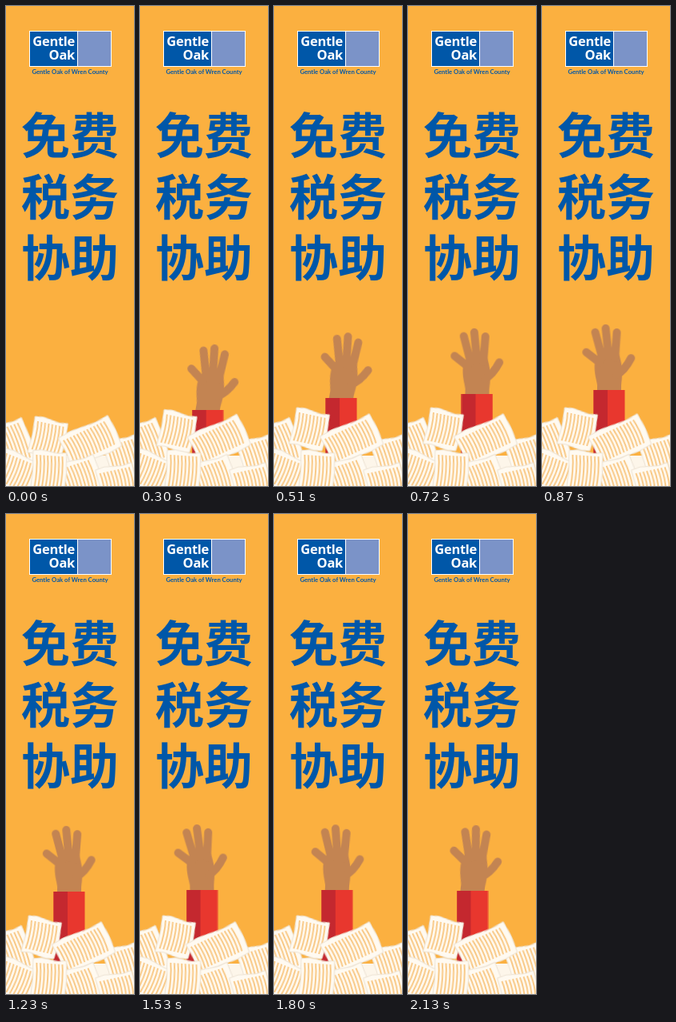
An HTML page that plays this animation: 160 px wide and 600 px high, repeating every 2400 ms.

```html
<!DOCTYPE html>
<html lang="zh-Hans">
<head>
<meta charset="utf-8">
<title>免费税务协助</title>
<style>
  html, body { margin: 0; width: 100%; height: 100%; overflow: hidden; background: #fbb040; }
  svg { display: block; width: 160px; height: 600px; }

  .headline { font: 700 61px "Noto Sans CJK SC", "Noto Sans CJK", sans-serif; fill: #0057a8; text-anchor: middle; }
  .brand { font: 700 16.5px "Open Sans", sans-serif; fill: #fff; text-anchor: end; letter-spacing: -.3px; }
  .tagline { font: 700 7.7px Lato, sans-serif; fill: #0057a8; text-anchor: middle; }

  .arm, .hand, .shift { animation: 2400ms linear infinite; }
  .arm { animation-name: rise; }
  .hand { animation-name: wave; transform-origin: 0 0; }
  .shift { animation-name: settle; }

  @keyframes rise {
    0% { transform: translate(90px, 625px); animation-timing-function: cubic-bezier(.2, .6, .5, 1); }
    21.25% { transform: translate(84px, 490px); }
    30% { transform: translate(86.5px, 485px); }
    41.25% { transform: translate(82px, 476px); }
    51.25% { transform: translate(79px, 472px); animation-timing-function: ease-out; }
    63.75% { transform: translate(77.5px, 470px); animation-timing-function: ease-in-out; }
    88.75%, 100% { transform: translate(80.5px, 471px); }
  }
  @keyframes wave {
    0%, 21.25% { transform: rotate(10deg); animation-timing-function: ease-in-out; }
    30% { transform: rotate(1deg); }
    41.25% { transform: rotate(0deg); }
    51.25% { transform: rotate(1deg); }
    63.75% { transform: rotate(-1deg); animation-timing-function: ease-in-out; }
    88.75%, 100% { transform: rotate(7deg); }
  }
  @keyframes settle {
    0% { transform: translate(var(--dx), var(--dy)); animation-timing-function: ease-out; }
    21.25%, 100% { transform: none; }
  }
</style>
</head>
<body>
<svg viewBox="0 0 160 600">
  <rect width="160" height="600" fill="#fbb040"/>

  <rect x="29" y="31" width="103" height="45" fill="#fff"/>
  <rect x="30" y="32" width="59" height="43" fill="#0057a8"/>
  <rect x="90" y="32" width="41" height="43" fill="#7b93c8"/>
  <text class="brand" x="86" y="50">Gentle</text>
  <text class="brand" x="86" y="67">Oak</text>
  <text class="tagline" x="80" y="85">Gentle Oak of Wren County</text>

  <g class="headline">
    <text x="80" y="185">免费</text>
    <text x="80" y="262">税务</text>
    <text x="80" y="338">协助</text>
  </g>

  <g class="arm">
    <g class="hand" fill="#c38452" stroke="#c38452" stroke-width="10" stroke-linecap="round">
      <path stroke="none" d="M-15 10V-6C-16 -14 -21 -26 -17 -40L-12 -46L12 -46C14 -36 18 -28 15 -6V10Z"/>
      <path fill="none" d="M-12 -34L-29 -47M-9 -40L-18 -72M-1 -42L-5 -77M7 -40L9 -72"/>
      <path fill="none" d="M9 -19Q19 -24 27 -40"/>
    </g>
    <rect x="-19.5" width="39" height="150" fill="#e8372e"/>
    <rect x="-19.5" width="17.5" height="150" fill="#c4282f"/>
  </g>

  <rect y="562" width="160" height="38" fill="#fdf6ea"/>
  <g id="papers"></g>
</svg>
<script>
  // cx, cy, width, height, angle, starting offset x, y
  const papers = [
    [148, 566, 44, 52, -16, 0, 0],
    [8, 548, 44, 56, -20, 0, 0],
    [44, 529, 42, 46, 12, 8, 11],
    [97, 543, 68, 42, -25, 8, 2],
    [12, 583, 48, 46, 22, 0, 0],
    [92, 590, 50, 46, -18, 0, 0],
    [138, 594, 46, 38, -12, 0, 0],
    [53, 582, 42, 50, 4, 0, 0]
  ];

  function sheet([cx, cy, w, h, angle, dx, dy]) {
    const a = w / 2, b = h / 2;
    const edge = `M${-a} ${-b}q${a / 2} -3 ${a} 0t${a} 0q3 ${b} 0 ${h}q${-a / 2} 3 ${-a} 0t${-a} 0q3 ${-b} 0 ${-h}z`;
    let lines = "";
    for (let x = -a + 5; x <= a - 4; x += 4.6) lines += `M${x} ${5 - b}q2.5 ${b - 5} 0 ${h - 10}`;
    return `<g class="shift" style="--dx:${dx}px;--dy:${dy}px">
      <g transform="translate(${cx} ${cy}) rotate(${angle})">
        <path d="${edge}" fill="#fffaf1" stroke="#ece2d3"/>
        <path d="${lines}" fill="none" stroke="#f8c47c" stroke-width="1.8"/>
      </g></g>`;
  }

  document.getElementById("papers").innerHTML = papers.map(sheet).join("");
</script>
</body>
</html>
```
